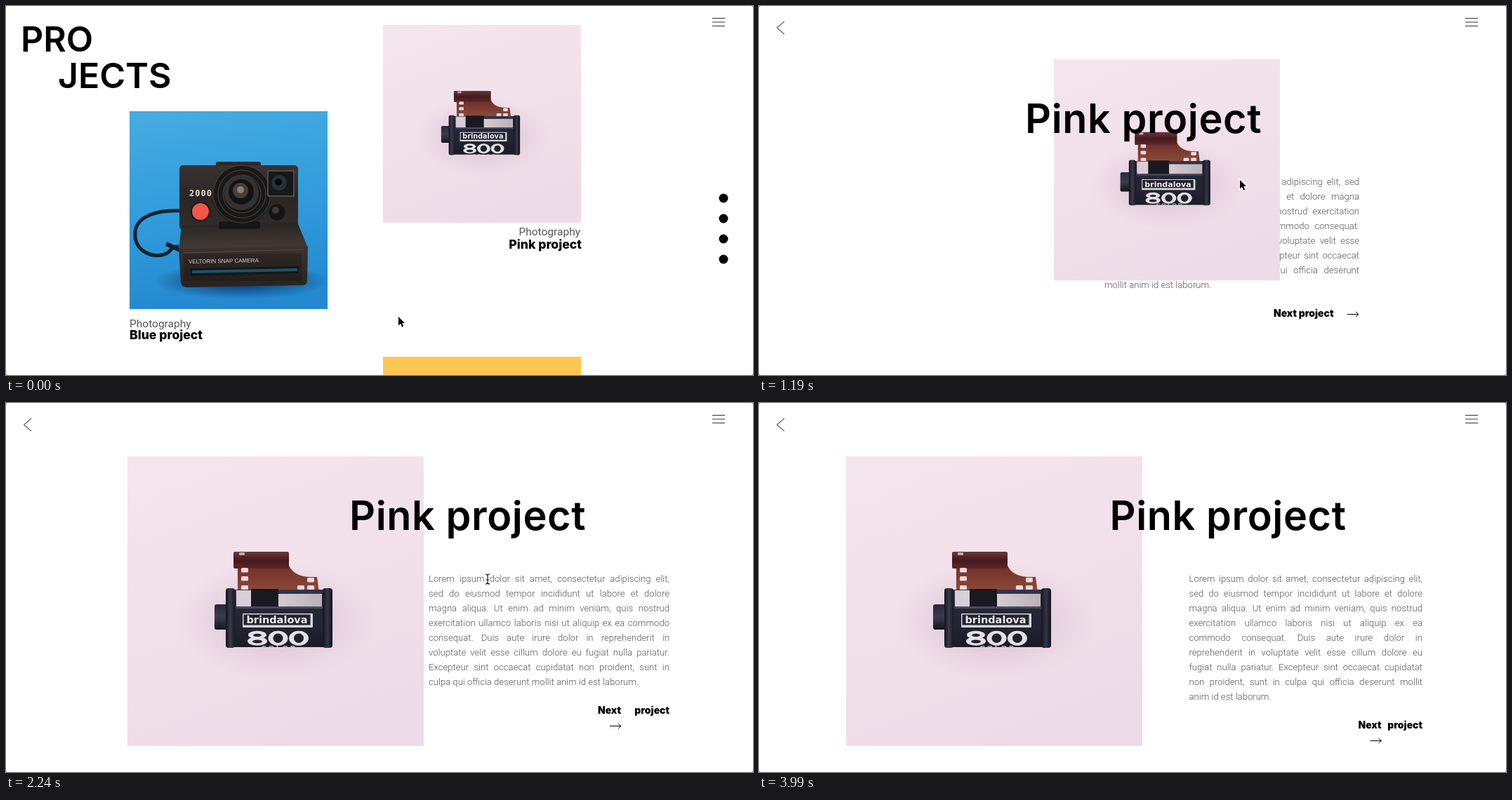
These frames come from a looping animation (1064x526 px, 4.06 s). An HTML page with a canvas:

```html
<!DOCTYPE html>
<html lang="en">
<head>
<meta charset="utf-8">
<title>Projects</title>
<style>
  html, body { margin: 0; width: 100%; height: 100%; overflow: hidden; background: #fff; }
  canvas { display: block; }
</style>
</head>
<body>
<canvas id="stage" width="1064" height="526"></canvas>
<script>
const ctx = document.getElementById('stage').getContext('2d');
const LOOP = 4060, STEP = 70, OPEN = 700;
const SANS = 'Inter, sans-serif', BODY = 'Roboto, sans-serif';

const words = ('Lorem ipsum dolor sit amet, consectetur adipiscing elit, sed do eiusmod tempor ' +
  'incididunt ut labore et dolore magna aliqua. Ut enim ad minim veniam, quis nostrud exercitation ' +
  'ullamco laboris nisi ut aliquip ex ea commodo consequat. Duis aute irure dolor in reprehenderit ' +
  'in voluptate velit esse cillum dolore eu fugiat nulla pariatur. Excepteur sint occaecat ' +
  'cupidatat non proident, sunt in culpa qui officia deserunt mollit anim id est laborum.').split(' ');
// Words per line for the wide, medium and narrow column
const wraps = {
  wide: [9, 9, 9, 9, 10, 9, 9, 5],
  medium: [8, 9, 9, 9, 8, 9, 8, 9],
  narrow: [8, 9, 9, 8, 7, 8, 7, 9, 4]
};

// Motion keys: [time, value]
const pictureLeft = [[700, 562], [910, 501], [1190, 420], [1680, 284], [2240, 173], [2660, 129], [2800, 124]];
const titleLeft = [[700, 302], [910, 336], [1190, 381], [1680, 455], [2240, 491], [2660, 500], [2800, 501.5]];

// Smooth curve through the keys, coming to rest at the last one
function curve(keys, t) {
  const last = keys.length - 1;
  if (t <= keys[0][0]) return keys[0][1];
  if (t >= keys[last][0]) return keys[last][1];
  const i = keys.findIndex(k => k[0] > t) - 1;
  const slope = n => {
    if (n === last) return 0;
    const a = keys[Math.max(0, n - 1)], b = keys[n + 1];
    return (b[1] - a[1]) / (b[0] - a[0]);
  };
  const [t0, v0] = keys[i], [t1, v1] = keys[i + 1];
  const d = t1 - t0, u = (t - t0) / d, u2 = u * u, u3 = u2 * u;
  return v0 * (2 * u3 - 3 * u2 + 1) + v1 * (3 * u2 - 2 * u3) +
    d * (slope(i) * (u3 - 2 * u2 + u) + slope(i + 1) * (u3 - u2));
}

function text(str, x, y, font, color = '#000', align = 'left', spacing = 0) {
  ctx.font = font;
  ctx.fillStyle = color;
  ctx.textAlign = align;
  ctx.letterSpacing = spacing + 'px';
  ctx.fillText(str, x, y);
  ctx.letterSpacing = '0px';
}

function justify(list, x, y, width, font, color) {
  ctx.font = font;
  const used = list.reduce((sum, w) => sum + ctx.measureText(w).width, 0);
  const gap = (width - used) / (list.length - 1);
  for (const w of list) {
    text(w, x, y, font, color);
    x += ctx.measureText(w).width + gap;
  }
}

function rect(x, y, w, h, color, r = 0) {
  ctx.fillStyle = color;
  ctx.beginPath();
  ctx.roundRect(x, y, w, h, r);
  ctx.fill();
}

function oval(x, y, rx, ry, color) {
  ctx.fillStyle = color;
  ctx.beginPath();
  ctx.ellipse(x, y, rx, ry, 0, 0, 7);
  ctx.fill();
}

const circle = (x, y, r, color) => oval(x, y, r, r, color);

function shape(d, color) {
  ctx.fillStyle = color;
  ctx.fill(new Path2D(d));
}

function line(d, color = '#222', width = 1) {
  ctx.strokeStyle = color;
  ctx.lineWidth = width;
  ctx.stroke(new Path2D(d));
}

function linear(x0, y0, x1, y1, ...colors) {
  const g = ctx.createLinearGradient(x0, y0, x1, y1);
  colors.forEach((c, i) => g.addColorStop(i / (colors.length - 1), c));
  return g;
}

function softShadow(x, y, rx, ry, rgb, alpha) {
  ctx.save();
  ctx.translate(x, y);
  ctx.scale(1, ry / rx);
  const g = ctx.createRadialGradient(0, 0, rx * 0.3, 0, 0, rx);
  g.addColorStop(0, `rgba(${rgb},${alpha})`);
  g.addColorStop(1, `rgba(${rgb},0)`);
  circle(0, 0, rx, g);
  ctx.restore();
}

// Film roll on pink, drawn on a 422 square and cropped to the given box
function filmPhoto(x, y, w, h) {
  ctx.save();
  ctx.beginPath();
  ctx.rect(x, y, w, h);
  ctx.clip();
  ctx.translate(x, y - (w - h) / 2);
  ctx.scale(w / 422, w / 422);
  rect(0, 0, 422, 422, linear(60, 0, 220, 422, '#f4e4ee', '#f2e1eb', '#eddce7'));
  softShadow(212, 238, 145, 84, '205,172,195', 0.45);

  ctx.translate(-124, -71.5);
  shape('M281 232H354C360 244 372 249 394 248L397 270H281Z', linear(0, 232, 0, 268, '#6f3029', '#8d4a38'));
  rect(275, 212, 79, 24, linear(0, 212, 0, 236, '#6a3a3a', '#46191b', '#5b2726'), 2);
  rect(283, 213, 8, 4, '#c9a5ab', 1);
  for (const [hx, hy] of [[286, 235], [286, 247], [286, 260], [380, 249], [380, 260], [366, 260]])
    rect(hx, hy, 10, 6.5, '#ecd6de', 1.5);

  rect(248, 287, 20, 36, linear(0, 287, 0, 323, '#272838', '#3b3c4e', '#14141c'), 3);
  rect(265, 266, 150, 82, linear(0, 266, 0, 348, '#34344a', '#262736', '#232431', '#1b1b26'), 4);
  rect(279, 267, 22, 23, '#d8ced8');
  rect(300, 265, 39, 25, '#1a1821');
  rect(339, 272, 62, 18, linear(339, 0, 401, 0, '#d6ccce', '#b9b2b8'));
  rect(279, 290, 123, 3, '#4b4a5c');
  rect(264, 264, 13, 85, linear(264, 0, 277, 0, '#14141c', '#3a3b4c', '#181820'), 4);
  rect(402, 264, 14, 85, linear(402, 0, 416, 0, '#15151d', '#34354a', '#111118'), 4);

  rect(288, 300, 100, 20, '#d9d5de', 1);
  rect(289.5, 301.5, 95, 15, '#22222d');
  text('brindalova', 337, 314, 'bold 14.5px "DejaVu Sans", sans-serif', '#f1ecf0', 'center');
  // Broad film speed digits
  const pale = '#e4e0e7', dark = '#20212c';
  oval(309, 330.5, 13, 5.7, pale);
  oval(309, 339.5, 14, 6.2, pale);
  oval(309, 331, 6, 2.2, dark);
  oval(309, 340, 7, 2.6, dark);
  for (const zx of [338.5, 368]) {
    oval(zx, 335.3, 14, 10.5, pale);
    oval(zx, 335.3, 7, 6.8, dark);
  }
  ctx.beginPath();
  ctx.rect(277, 345, 125, 3);
  ctx.clip();
  text('COLOR', 340, 354, 'bold 11px "DejaVu Sans", sans-serif', '#b5b0ba', 'center', 2);
  ctx.restore();
}

// Instant camera on blue
function cameraPhoto() {
  ctx.save();
  ctx.beginPath();
  ctx.rect(176, 150, 282, 282);
  ctx.clip();
  rect(176, 150, 282, 282, linear(260, 150, 300, 432, '#45abe0', '#319cdc', '#2388ce'));
  softShadow(335, 392, 125, 26, '8,50,100', 0.75);
  line('M250 292C215 290 186 300 184 322C182 348 205 358 222 355C238 352 232 342 246 343', '#14222c', 5);
  line('M228 339L248 348', '#14222c', 6);

  rect(299, 222, 64, 14, '#2c2826', 3);
  rect(247, 227, 169, 92, linear(0, 227, 0, 319, '#3a3431', '#2b2624', '#332d2a'), 5);
  shape('M250 313L415 308L430 345L246 348Z', linear(0, 308, 0, 348, '#292422', '#443c37'));
  shape('M246 346L430 342L429 392Q428 398 422 398L257 401Q250 401 249 394Z',
    linear(0, 342, 0, 400, '#3b332f', '#29231f'));
  line('M253 352L424 347', '#574d47', 1);
  rect(303, 307, 59, 11, '#171514', 3);

  circle(336, 269, 42, '#191818');
  ctx.lineWidth = 1;
  ctx.strokeStyle = '#4b4743';
  for (const r of [41, 34, 27]) {
    ctx.beginPath();
    ctx.arc(336, 268, r, 0, 7);
    ctx.stroke();
  }
  circle(335, 266, 25, '#34312f');
  circle(335, 265, 18, '#141313');
  circle(334, 263, 11, '#453e39');
  circle(334, 262, 5, '#8c7f72');

  rect(372, 234, 39, 38, '#514a45', 2);
  rect(374, 236, 35, 34, '#151719', 2);
  circle(389, 252, 11, '#22333c');
  circle(388, 251, 5, '#080a0c');
  circle(386, 294, 11.5, '#151414');
  circle(384, 291, 5, '#3d3834');

  circle(277, 293, 14, '#171413');
  circle(277, 293, 12, '#f0564a');
  text('2000', 261, 271, 'bold 12px "DejaVu Sans Mono", monospace', '#e8dfd0', 'left', 1);
  rect(253, 353, 168, 39, 'rgba(20,16,14,.28)', 2);
  ctx.save();
  ctx.translate(260, 367);
  ctx.rotate(-0.018);
  text('VELTORIN SNAP CAMERA', 0, 0, '8px "Liberation Sans", sans-serif', '#d8d2ca');
  ctx.restore();
  shape('M262 374L417 371L416 381L263 385Z', '#131719');
  line('M265 379L415 376', '#1e526b', 4);
  ctx.restore();
}

function listPage() {
  const heading = `600 50px ${SANS}`, kind = `400 15.5px ${BODY}`, name = `800 17.6px ${SANS}`;
  text('PRO', 21, 65, heading);
  text('JECTS', 74, 117, heading);
  cameraPhoto();
  text('Photography', 176, 458, kind, '#555');
  text('Blue project', 176, 475, name);
  filmPhoto(537, 27, 282, 282);
  text('Photography', 818, 327, kind, '#555', 'right');
  text('Pink project', 820, 346, name, '#000', 'right');
  rect(537, 500, 282, 26, '#fdc850');
  for (const y of [274, 303, 332, 361]) circle(1022, y, 6.5, '#000');
}

function detailPage(t) {
  const title = curve(titleLeft, t);
  const left = title + 111, width = Math.min(363, 945 - left);
  const mode = width > 362 ? 'wide' : width > 341 ? 'medium' : 'narrow';
  const copy = `300 13.1px ${BODY}`, strong = `900 13.9px ${SANS}`;

  let at = 0;
  wraps[mode].forEach((count, i, all) => {
    const row = words.slice(at, at += count), y = 255.3 + i * 20.9;
    if (i < all.length - 1) justify(row, left, y, width, copy, '#555');
    else text(row.join(' '), left, y, copy, '#555');
  });

  const next = title + 352, nextY = mode === 'narrow' ? 464 : 443;
  let arrowX = next + 105, arrowY = nextY - 3.5;
  if (mode === 'wide') text('Next project', next, nextY, strong);
  else {
    justify(['Next', 'project'], next, nextY, 945 - next, strong, '#000');
    arrowX = next + 17;
    arrowY += 21;
  }
  line(`M${arrowX} ${arrowY}h16m-4 -3.5l4 3.5l-4 3.5`, '#000');

  const w = Math.min(422, title - 59);
  filmPhoto(curve(pictureLeft, t), 76, w, w * 413 / 422);
  text('Pink project', title - 2, 181, `600 57.5px ${SANS}`, '#000', 'left', 0.6);
  line('M36 22L25.5 31L36 40', '#111');
}

const ease = u => u * u * (3 - 2 * u);
const progress = (t, from, to) => ease(Math.min(1, Math.max(0, (t - from) / (to - from))));

function cursor(t) {
  const reach = progress(t, 70, 560), leave = progress(t, 3430, 3850);
  const x = 559 + 126 * reach - 45 * leave;
  const y = 443 - 195 * reach + 290 * leave;
  if (t >= 2000 && y < 420) {
    const beam = `M${x - 2} ${y - 4}q3 0 3 2v10q0 2 -3 2m6 0q-3 0 -3 -2v-10q0 -2 3 -2m-5 8h4`;
    line(beam, '#fff', 2.6);
    line(beam, '#000', 1.1);
    return;
  }
  ctx.save();
  ctx.translate(x, y);
  const arrow = 'M0 0V12.5L3 9.8L5 14.4L7.2 13.4L5.2 9H9Z';
  line(arrow, '#fff', 2);
  shape(arrow, '#000');
  ctx.restore();
}

function draw(t) {
  rect(0, 0, 1064, 526, '#999');
  rect(0, 0, 1064, 526, '#fff', 3);
  if (t < OPEN) listPage();
  else detailPage(t);
  line('M1006 17.5h18m-18 5.5h18m-18 5.5h18', '#333');
  cursor(t);
}

const start = performance.now();
function tick() {
  const t = (performance.now() - start) % LOOP;
  draw(Math.floor(t / STEP) * STEP);
  requestAnimationFrame(tick);
}
tick();
</script>
</body>
</html>
```
